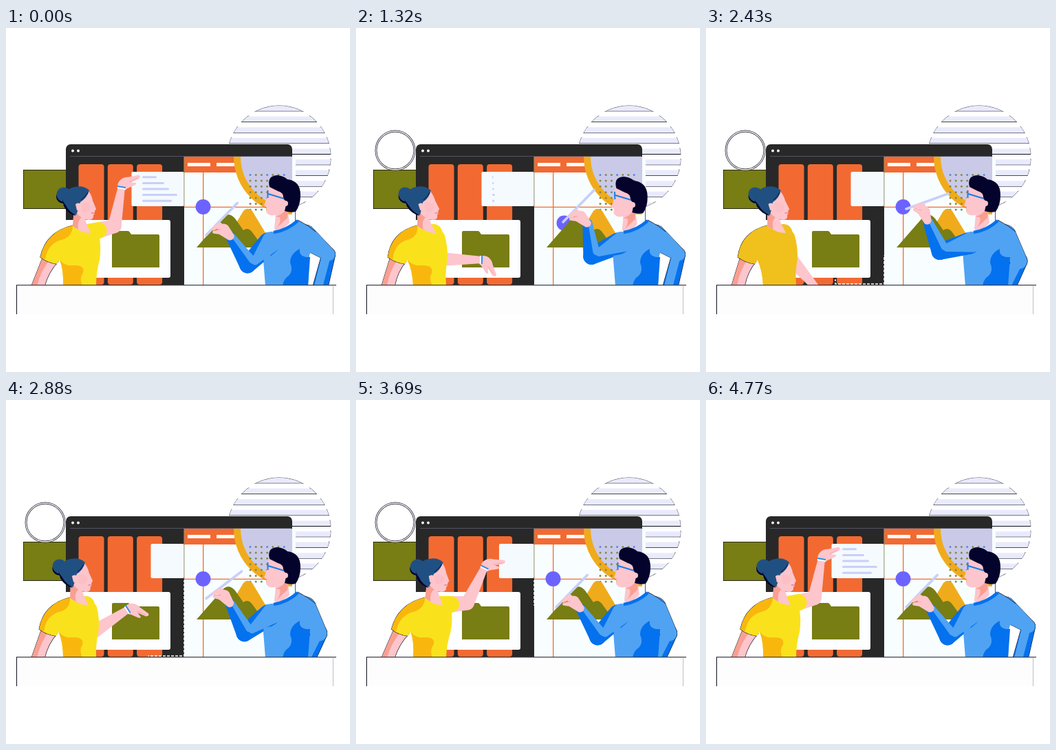
Write an HTML page with a canvas that moves like this. It is 500 px wide and 500 px high and loops after 4920 ms.

```html
<!DOCTYPE html>
<html lang="en">
<head>
<meta charset="utf-8">
<style>
html, body { margin: 0; width: 100%; height: 100%; overflow: hidden; background: #fff; }
canvas { display: block; width: 500px; height: 500px; }
</style>
</head>
<body>
<canvas id="stage" width="500" height="500"></canvas>
<script>
const ctx = document.getElementById('stage').getContext('2d');
const LOOP = 4920;
const INK = '#10101c', DARK = '#282828', ORANGE = '#f26a32', OLIVE = '#787d14', AMBER = '#f0ab1c',
  PAPER = '#f8feff', LILAC = '#cacae8', LINE = '#c8d0f8', SKIN = '#fdc5cc', CORAL = '#f99f92',
  HAIR = '#205082', NAVY = '#03032c', BLUE = '#50a3f3', DEEP = '#0471ee', VIOLET = '#6c63ff';

// Timing
const ramp = (t, a, b) => Math.min(1, Math.max(0, (t - a) / (b - a)));
const smooth = u => u * u * (3 - 2 * u);
const mix = (a, b, u) => a + (b - a) * u;
// Rises from a to b, stays at one, falls from c to d.
const hold = (t, a, b, c, d) => ramp(t, a, b) - ramp(t, c, d);
const ease = (t, a, b, c, d) => smooth(hold(t, a, b, c, d));
const within = (t, a, b) => t >= a && t < b;

// Drawing
function fill(d, color) {
  ctx.fillStyle = color;
  ctx.fill(new Path2D(d));
}
function stroke(d, color, width = 1) {
  ctx.strokeStyle = color;
  ctx.lineWidth = width;
  ctx.stroke(new Path2D(d));
}
function box(x, y, w, h, color, r = 0) {
  ctx.fillStyle = color;
  ctx.beginPath();
  ctx.roundRect(x, y, w, h, r);
  ctx.fill();
}
function disc(x, y, r, color) {
  ctx.fillStyle = color;
  ctx.beginPath();
  ctx.arc(x, y, r, 0, 7);
  ctx.fill();
}
// Tapered capsule between two circles.
function limb(x1, y1, r1, x2, y2, r2, color, outline) {
  const a = Math.atan2(y2 - y1, x2 - x1), q = Math.PI / 2;
  ctx.beginPath();
  ctx.arc(x1, y1, r1, a + q, a - q);
  ctx.arc(x2, y2, r2, a - q, a + q);
  ctx.closePath();
  if (outline) {
    ctx.strokeStyle = INK;
    ctx.lineWidth = 1.2;
    ctx.stroke();
  }
  ctx.fillStyle = color;
  ctx.fill();
}
function group(draw) {
  ctx.save();
  draw();
  ctx.restore();
}
function placed(x, y, angle, draw) {
  group(() => {
    ctx.translate(x, y);
    ctx.rotate(angle);
    draw();
  });
}
// Elbow of a two-bone arm; side picks the bending direction.
function elbow(sx, sy, wx, wy, upper, fore, side) {
  const d = Math.min(Math.hypot(wx - sx, wy - sy), upper + fore);
  const a = Math.atan2(wy - sy, wx - sx) +
    side * Math.acos((upper * upper + d * d - fore * fore) / (2 * upper * d));
  return [sx + upper * Math.cos(a), sy + upper * Math.sin(a)];
}

function stripes() {
  for (let y = 113; y < 263; y += 15.6) group(() => {
    ctx.beginPath();
    ctx.rect(320, y - 1, 155, 9.5);
    ctx.clip();
    ctx.beginPath();
    ctx.arc(397, 188, 75, 0, 7);
    ctx.strokeStyle = INK;
    ctx.stroke();
    ctx.clip();
    box(320, y, 155, 8, '#e9ebfc');
    box(320, y + 7.7, 155, 0.8, INK);
  });
}

function ring(t) {
  const drawn = hold(t, 150, 920, 3950, 4700);
  if (!drawn) return;
  ctx.beginPath();
  ctx.arc(57, 178, 28, -Math.PI / 2, (drawn * 2 - 0.5) * Math.PI);
  for (const [color, width] of [[INK, 2.8], ['#f4f5ff', 1.4]]) {
    ctx.strokeStyle = color;
    ctx.lineWidth = width;
    ctx.stroke();
  }
}

function browser(t) {
  box(87, 169, 329, 206, DARK, [7, 7, 0, 0]);
  disc(97, 178.5, 1.9, '#fff');
  disc(105, 178.5, 1.9, '#fff');
  box(93, 186, 322, 0.8, '#62627a');
  for (let i = 0; i < 3; i++) box(105.5 + i * 42.3, 198, 37, 175, ORANGE, 4);
  box(85, 279, 154, 84, '#fdfeff', 3);
  fill('M154 297q0-2 2-2h21q2 0 3 2l2 3h39q2 0 2 2v46h-69z', OLIVE);

  box(259, 187, 162, 187, PAPER);
  box(259, 187, 83, 23, ORANGE);
  box(264, 196, 33, 5, '#fff');
  box(306, 196, 26, 5, '#fff');
  group(() => {
    ctx.beginPath();
    ctx.rect(259, 187, 157, 90);
    ctx.clip();
    disc(415, 187, 84, AMBER);
    disc(415, 187, 74, LILAC);
  });
  for (let row = 0; row < 7; row++)
    for (let col = 0; col < 7; col++)
      disc(355 + col * 8.2, 213.5 + row * 8.4, 1.5, row || col % 3 ? '#85884a' : '#5888e0');
  box(286, 210, 1.3, 164, ORANGE);
  box(259, 259.7, 122, 1.3, ORANGE);
  stroke('M420.5 250V285', INK, 0.7);

  const low = ease(t, 100, 700, 1320, 2300);
  disc(286.5 + 16 * low, 260 + 23.5 * low, 11, VIOLET);
  fill('M336 281L345 266Q351 259 358 266L382 306L376 319H340Z', AMBER);
  fill('M277 319L311 280Q322 264 333 277L345 294Q352 289 358 297L374 319Z', OLIVE);
}

// Dashed trail runs along the bottom and climbs to the card.
function trail(t) {
  const length = 189, head = length * ramp(t, 1800, 2790), tail = length * ramp(t, 2300, 3850) ** 2;
  if (head - tail < 1) return;
  const point = s => s < 8 ? [188, 364 + s] : s < 79 ? [180 + s, 372] : [259, 451 - s];
  const stops = [tail, ...[8, 79].filter(s => s > tail && s < head), head];
  group(() => {
    ctx.setLineDash([4, 2]);
    ctx.lineDashOffset = tail;
    stroke('M' + stops.map(s => point(s).join(' ')).join('L'), '#fff', 1.6);
  });
}

function card(t) {
  const x = 182.5 + 28 * ease(t, 1400, 2050, 3540, 4350);
  box(x, 209, 259 - x, 50, '#f5faff', 2);
  box(258.4, 187, 1, 73, '#90916a');
  const shown = 1 - hold(t, 560, 1380, 4280, 4700);
  if (shown) [21, 32, 39, 51, 43].forEach((w, i) =>
    box(198, 215.3 + i * 8.6, w * shown, 3, LINE, 1.5));
}

// Lean and wrist position of the woman.
const HOLDING = [0, 168, 231], RAISED = [0, 133, 231], LOWERED = [-11, 183, 337],
  DRAGGING = [-11, 162, 380], TOUCHING = [-2, 187, 257], PULLING = [5, 187, 243];
const ACTS = [[90, HOLDING], [750, RAISED], [1320, LOWERED], [2000, DRAGGING], [2430, DRAGGING],
  [3210, TOUCHING], [3690, PULLING], [4350, HOLDING]];

function pose(t) {
  const next = ACTS.findIndex(([time]) => time > t);
  if (next < 1) return HOLDING;
  const [a, from] = ACTS[next - 1], [b, to] = ACTS[next];
  return from.map((v, i) => mix(v, to[i], smooth(ramp(t, a, b))));
}

function woman(t) {
  const [lean, wx, wy] = pose(t);
  const flat = within(t, 570, 1080) || within(t, 2190, 2700);
  const shirt = flat ? '#f0c01d' : '#f9e21b', shade = flat ? shirt : '#f9b70e';
  const sx = 119 + lean * 0.6, sy = 298;
  const [ex, ey] = elbow(sx, sy, wx, wy, 40, 58, 1);
  const turn = Math.atan2(wy - ey, wx - ex);

  limb(sx, sy, 13, ex, ey, 10, SKIN);
  limb(ex, ey, 10, wx, wy, 5, SKIN);
  placed(wx, wy, turn + 0.88, () => {
    fill('M-5-3C-1-11 9-12 15-8L30-3Q33 0 28 2L15 1L21 5Q21 8 16 7L6 6Q-1 8-5 4Z', SKIN);
    stroke('M13-1L27 0', CORAL, 0.7);
  });
  placed(wx, wy, turn, () => {
    stroke('M-2-6V6', '#fff', 2);
    stroke('M0-6V6', '#2d92e8', 2);
  });
  limb(sx, sy, 13, mix(sx, ex, 0.4), mix(sy, ey, 0.4), 12, shirt);

  group(() => {
    const k = -lean / 124;
    ctx.transform(1, 0, k, 1, -k * 374, 0);
    const arm = 'M54 332L76 339Q62 354 56 375H37Z';
    stroke(arm, INK, 1.2);
    fill(arm, SKIN);
    fill('M54 332L64 336Q50 354 45 375H37Z', CORAL);

    const shoulder = 'M97 287Q76 292 65 304Q54 315 50 333';
    stroke(shoulder + 'Q60 341 74 343', INK, 1.2);
    fill(shoulder + 'Q60 341 74 343L78 337Q84 352 83 375H131Q131 355 136 337Q139 318 135 300L129 291L118 298Z', shirt);
    fill(shoulder + 'L57 336Q60 316 77 309Q97 305 97 287Z', shade);
    fill('M78 337Q86 347 98 345Q115 344 112 356Q106 363 111 375H83Q84 352 78 337Z', shade);

    fill('M99 260L97 288Q109 298 123 298L117 284L112 268Z', SKIN);
    fill('M99 262L97 288L105 293Q103 280 110 275Z', CORAL);
    fill('M103 248L120 237Q125 244 126 251L131 263L129 266L129 270L127 272Q128 279 120 279' +
      'Q109 278 101 267Z', SKIN);
    fill('M111 254Q119 252 124 259Q122 269 113 268Q108 261 111 254Z', '#fcbfc6');
    stroke('M124 269H129', '#ea6070', 1.1);

    disc(83, 245, 10, NAVY);
    disc(84, 242, 10.5, HAIR);
    fill('M82 249Q84 256 93 259L101 273Q89 269 84 259Z', NAVY);
    fill('M83 252Q83 237 96 232Q112 227 121 236Q118 247 108 253Q105 264 102 272Q92 268 87 258Z', HAIR);
    fill('M101 256q7-4 8 3q-1 6-6 6z', SKIN);
    stroke('M109 250Q116 245 119 239', NAVY, 0.8);
  });
}

function restingArm(t) {
  const tuck = ease(t, 1750, 2500, 3750, 4550);
  const ex = 469 - 14 * tuck, ey = 329 + 10 * tuck, r = 9.5 + 2 * tuck, hx = 455 - 20 * tuck;
  limb(434, 303, 17, ex, ey, r, BLUE, true);
  limb(ex, ey, r, hx, 384, 11, DEEP, true);
  limb(434, 303, 17, ex, ey, r, BLUE);
  limb(ex - 3, ey, r - 3, hx - 3, 384, 6, BLUE);
}

function drawingArm(t) {
  const lift = ease(t, 800, 1320, 2450, 3150), swing = ease(t, 1320, 2000, 2450, 3150);
  const px = 291 + 10 * lift - 10 * swing, py = 301 - 19 * lift - 19 * swing;
  const tilt = -0.8 + 0.45 * swing, cos = Math.cos(tilt), sin = Math.sin(tilt);
  const wx = px + 23 * cos - 27 * sin, wy = py + 23 * sin + 27 * cos;
  const [ex, ey] = elbow(382, 313, wx, wy, 44, 48, -1);

  limb(382, 313, 16, ex, ey, 12, DEEP);
  limb(ex, ey, 12, wx, wy, 7, DEEP);
  limb(386, 311, 15, ex + 11, ey - 6, 6, BLUE);
  limb(ex + 7, ey - 7, 5, wx + 4, wy - 1, 3, BLUE);
  fill('M374 331L378 375H389Q379 349 385 329Z', BLUE);

  placed(px, py, tilt, () => {
    limb(23, 26, 6, 23, 13, 9, SKIN);
    ctx.lineCap = 'round';
    stroke('M0 0H65', LINE, 3.6);
    limb(24, 4, 4, 14, 1, 2.5, SKIN);
    limb(20, 14, 4, 11, 5, 2.2, SKIN);
    stroke('M20 9L12 3', CORAL, 0.8);
  });
}

function man(t) {
  restingArm(t);
  fill('M389 296Q405 293 424 279Q444 289 451 308L441 330L439 375H377L372 312Q378 301 389 296Z', BLUE);
  stroke('M424 279Q440 287 450 296', INK, 0.8);
  fill('M439 375H402Q403 365 411 360Q418 353 413 341Q413 328 427 321Q425 334 442 333Z', DEEP);
  drawingArm(t);

  group(() => {
    const nod = ease(t, 100, 700, 1400, 2300), k = nod * 0.025;
    ctx.transform(1, 0, k, 1, -k * 374 - nod, nod * 2);
    fill('M393 262L390 291Q391 296 398 293Q408 289 412 283L409 260Z', SKIN);
    fill('M391 274Q402 272 407 262L410 266L409 276L394 290Q400 282 398 275Z', CORAL);
    fill('M383 228Q379 239 379 247L375 258L379 261L378 267Q381 274 391 272Q404 270 410 259L409 238Z', SKIN);
    fill('M383 231Q379 215 394 214Q404 215 409 220Q428 222 428 243Q428 257 421 267' +
      'Q413 269 405 266L408 253L403 248Q404 239 395 237Z', NAVY);
    disc(406, 255, 4, SKIN);
    stroke('M380.5 236V247M381 241L404 248', '#197fe8', 2);
  });
  stroke('M389 297Q409 294 424 280', DEEP, 4.5);
}

function table() {
  box(15, 373.5, 461, 42.5, '#fdfdfd');
  stroke('M15 373.8H480M15.5 374V416', INK);
  stroke('M475.5 374V416', '#b0b0b8', 0.8);
}

const start = performance.now();
function frame() {
  const t = (performance.now() - start) % LOOP;
  ctx.fillStyle = '#fff';
  ctx.fillRect(0, 0, 500, 500);
  stripes();
  box(25, 206, 64, 57, INK);
  box(25.7, 206.7, 63, 55.6, OLIVE);
  ring(t);
  browser(t);
  trail(t);
  card(t);
  man(t);
  woman(t);
  table();
  requestAnimationFrame(frame);
}
frame();
</script>
</body>
</html>
```
